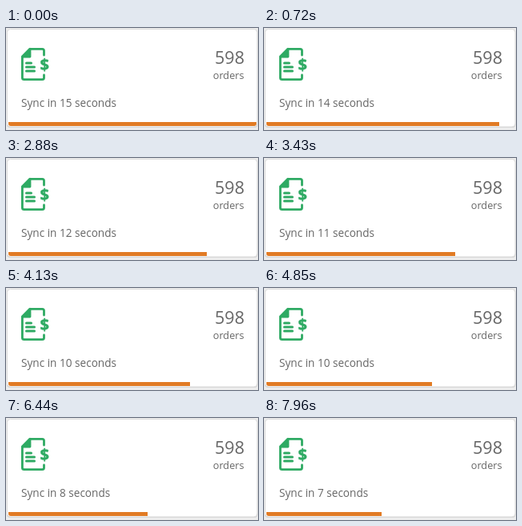
Animation, 315 px wide and 128 px high, one loop 8000 ms. Source, as an HTML page:

```html
<!DOCTYPE html>
<html lang="en">
<head>
<meta charset="utf-8">
<title>Order sync</title>
<style>
  html, body { margin: 0; width: 100%; height: 100%; overflow: hidden; background: #ededed; }
  svg { display: block; width: 315px; height: 128px; }
  text { font-family: "Open Sans", sans-serif; fill: #666; }
  .icon { fill: none; stroke: #2eaa63; stroke-width: 2.8; stroke-linecap: round; stroke-linejoin: round; }
  .icon text { fill: #2eaa63; stroke-width: 0.5; font-weight: 700; font-size: 20px; }
</style>
</head>
<body>
<svg viewBox="0 0 315 128">
  <clipPath id="card"><rect x="3" y="3" width="310" height="120" rx="3"/></clipPath>
  <rect x="1" y="2" width="313.5" height="123" rx="4" fill="#d2d2d2"/>
  <rect x="1.5" y="1.5" width="312.5" height="122.5" rx="4" fill="#fff" stroke="#dcdcdc"/>
  <g class="icon">
    <path d="M47.5 34V28.5Q47.5 26.3 45.3 26.3H30L20.4 36V62.5Q20.4 64.7 22.6 64.7H45.3Q47.5 64.7 47.5 62.5V59"/>
    <path d="M30 26.3V36H20.4Z" fill="#2eaa63"/>
    <path d="M25.5 44H31.5M25.5 49H35.5M25.5 54H35.5" stroke-width="3"/>
    <text x="48.3" y="52.7" text-anchor="middle">$</text>
  </g>
  <text x="298" y="45.4" font-size="21.6" text-anchor="end">598</text>
  <text x="297.5" y="64" font-size="12.7" text-anchor="end">orders</text>
  <text id="label" x="19" y="99" font-size="13.6">Sync in 15 seconds</text>
  <g clip-path="url(#card)">
    <rect id="bar" x="3" y="118" width="310" height="5" fill="#e17b24"/>
  </g>
</svg>
<script>
  const LOOP = 8000, TOTAL = 15, FULL = 310, GLIDE = 1000;
  const ticks = [80, 1030, 2080, 3110, 4130, 5160, 6120, 7080];
  const label = document.getElementById("label");
  const bar = document.getElementById("bar");

  const bezier = (a, b, s) => 3 * a * s * (1 - s) ** 2 + 3 * b * s * s * (1 - s) + s ** 3;

  // The CSS "ease" curve, solved by bisection.
  function ease(x) {
    if (x >= 1) return 1;
    let low = 0, high = 1;
    for (let i = 0; i < 20; i++) {
      const mid = (low + high) / 2;
      if (bezier(0.25, 0.25, mid) < x) low = mid; else high = mid;
    }
    return bezier(0.1, 1, low);
  }

  function draw() {
    const time = performance.now() % LOOP;
    const count = ticks.filter(tick => tick <= time).length;
    const left = TOTAL - count;
    const pending = count ? 1 - ease((time - ticks[count - 1]) / GLIDE) : 0;
    const text = `Sync in ${left} seconds`;
    if (label.textContent !== text) label.textContent = text;
    bar.setAttribute("width", Math.floor(FULL * (left + pending) / TOTAL));
    requestAnimationFrame(draw);
  }
  draw();
</script>
</body>
</html>
```
